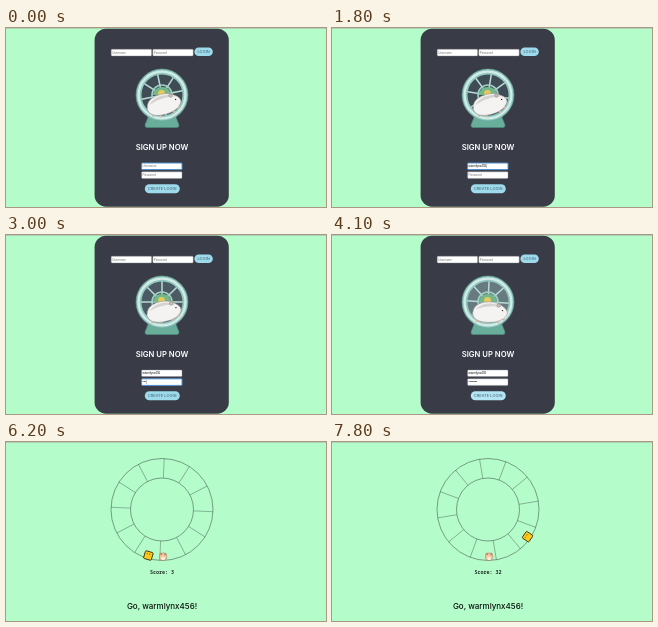
These frames come from a looping animation (320x179 px, 8000 ms). An HTML page:

```html
<!DOCTYPE html>
<html lang="en">
<head>
<meta charset="utf-8">
<title>Hamster wheel</title>
<style>
html, body { margin: 0; height: 100%; overflow: hidden; background: #b5fccb; }
svg { display: block; width: 100vw; height: 100vh; font-family: Inter, sans-serif; }
.field rect { fill: #fff; stroke: #8b8d92; stroke-width: .4; }
.field text { font: 3px "Liberation Sans", Arial, sans-serif; fill: #777; }
.field.filled text { fill: #111; }
.field.focus rect { stroke: #4c8fd0; stroke-width: 1; }
.button rect { fill: #9cdaec; }
.button text { font-size: 4px; fill: #4a6472; text-anchor: middle; }
.title { font-size: 8px; font-weight: 500; text-anchor: middle; }
.heading { font-size: 7.7px; font-weight: 600; fill: #fff; }
#score { font: 700 5px "Noto Sans Mono", monospace; text-anchor: middle; }
</style>
</head>
<body>
<svg viewBox="0 0 320 179" preserveAspectRatio="none">
  <rect width="320" height="179" fill="#b5fccb"/>
  <rect width="320" height=".8" fill="#a9c9b3"/>

  <g id="login">
    <rect x="88.6" y=".7" width="134.2" height="178" rx="11.5" fill="#393c47"/>
    <g id="fields"></g>
    <g class="button"><rect x="188.4" y="19.4" width="18.4" height="8.6" rx="4.3"/><text x="197.6" y="25.1">LOGIN</text></g>

    <path d="M143 87h26l4 10q0 2.5-2 2.5h-30q-2 0-2-2.5z" fill="#69ad9b" stroke="#4f8d80" stroke-width=".6"/>
    <circle cx="156" cy="67" r="22" fill="#3f4c56"/>
    <circle id="glow" cx="156" cy="67" r="21" fill="#a8c8c8"/>
    <g id="cage" fill="none" stroke="#b9dcd6" stroke-width="1.5"></g>
    <circle cx="156" cy="67" r="10" fill="none" stroke="#9fcfc5" stroke-width="1.6"/>
    <circle cx="156" cy="67" r="23.2" fill="none" stroke="#91c8bf" stroke-width="5.4"/>
    <circle cx="156" cy="67" r="23.4" fill="none" stroke="#d3ece7" stroke-width="2.2"/>
    <circle cx="156" cy="67" r="26" fill="none" stroke="#6ba79c" stroke-width=".6"/>
    <path d="M147 67q1-8 9-8t9 8z" fill="#74b78b"/>
    <circle cx="155.5" cy="65.5" r="3.4" fill="#e8c95a"/>
    <g id="runner" stroke="#8f8b8a" stroke-width=".5">
      <path d="M-11 6l-2 3M-5 9l-1 2M7 8l2 2M12 6l3 1" stroke="#dfb9ac" stroke-width="1.8" stroke-linecap="round"/>
      <path d="M-17 1q1-9 11-11 11-2 18 3 8 5 5 10-5 7-18 7-15 0-16-9z" fill="#f4f3f1"/>
      <path d="M-14-3q6-6 14-6 8 0 13 4-13-3-27 2z" fill="#d5d2cf" stroke="none"/>
      <circle cx="9" cy="-7" r="1.8" fill="#cbb9b3"/>
      <circle cx="13" cy="-2" r=".7" fill="#222" stroke="none"/>
    </g>

    <text class="title heading" x="156" y="122">SIGN UP NOW</text>
    <g class="button"><rect id="create" x="138.8" y="156.3" width="35" height="9" rx="4.5"/><text x="156.2" y="162.2">CREATE LOGIN</text></g>
  </g>

  <g id="game">
    <g id="wheel" fill="none" stroke="#3a5344" stroke-width=".55">
      <g transform="translate(156 67.5)">
        <circle r="51"/><circle r="31.5"/>
        <g id="spokes" stroke-width=".4"></g>
        <g id="cheese" stroke="#2a2410" stroke-width=".8">
          <rect x="44" y="-4" width="8" height="8" rx="1" fill="#ffc91c"/>
          <path d="M46.5-1.5v1M46.5 1.2v.8" stroke-width=".8"/>
        </g>
      </g>
      <g id="jumper" stroke="#a3705a" stroke-width=".5">
        <path d="M-3.5 0q-.5-3 1.5-3.5 3-1.5 5 .5 1.5 3 .2 5-3 2.5-5.8 1Q-3.5 2-3.5 0z" fill="#f8c9a4"/>
        <circle cx="-2" cy="-3" r="1" fill="#e99a72"/><circle cx="2.3" cy="-2.8" r="1" fill="#e99a72"/>
        <ellipse cx=".2" cy="1.4" rx="1.8" ry="1.5" fill="#fff1e4" stroke="none"/>
      </g>
      <text id="score" x="156" y="131.8" fill="#1b2a20" stroke="none"></text>
    </g>
    <text id="cheer" class="title" fill="#0b120e"></text>
  </g>
</svg>
<script>
const LOOP = 8000, GAME = 5300, SPIN = 5900, USER = "warmlynx456";
const $ = id => document.getElementById(id);
const set = (el, attrs) => { for (const k in attrs) el.setAttribute(k, attrs[k]); };
const clamp = (v, lo, hi) => Math.min(hi, Math.max(lo, v));

function add(parent, tag, attrs) {
  const el = document.createElementNS("http://www.w3.org/2000/svg", tag);
  set(el, attrs);
  return parent.appendChild(el);
}

function field(x, y, hint) {
  const g = add($("fields"), "g", {});
  add(g, "rect", { x, y, width: 40.4, height: 6.6, rx: .8 });
  const label = add(g, "text", { x: x + 1, y: y + 4.4 });
  return (value, focus) => {
    g.setAttribute("class", "field" + (value ? " filled" : "") + (focus ? " focus" : ""));
    label.textContent = (value || hint) + (focus && value ? "|" : "");
  };
}

function spokes(parent, count, inner, outer) {
  for (let i = 0; i < count; i++)
    add(parent, "path", { d: `M${inner} 0H${outer}`, transform: `rotate(${i * 360 / count})` });
}

field(105.2, 21.3, "Username")("");
field(146.8, 21.3, "Password")("");
const username = field(135.6, 135, "Username");
const password = field(135.6, 143.8, "Password");
spokes($("cage"), 8, 2, 22);
spokes($("spokes"), 12, 31.5, 51);
$("cheer").textContent = `Go, ${USER}!`;

function drawLogin(t) {
  const onPassword = t >= 2100;
  username(USER.slice(0, clamp(Math.floor((t - 230) / 142), 0, 11)), !onPassword);
  password("•".repeat(clamp(Math.floor((t - 2570) / 135), 0, 8)), onPassword && t < 4000);
  $("create").style.fill = t >= 4000 ? "#b3e5f3" : "";

  const run = t < 4000 ? clamp(t, 100, 3600) : Math.min(t, 4100);
  const swing = Math.cos((run - 100) / 425 * 2 * Math.PI);
  set($("cage"), { transform: `translate(156 67) rotate(${-run * .12})` });
  set($("glow"), { opacity: .2 * (1 - swing) });
  set($("runner"), { transform: `translate(157.5 ${77 - swing * .5}) rotate(${-6 - 8 * swing})` });
}

function drawGame(t) {
  const spinning = t >= SPIN;
  $("wheel").style.display = spinning ? "" : "none";
  set($("cheer"), spinning ? { x: 156, y: 166.8 } : { x: 157.2, y: 19.6 });
  const angle = 75 - (Math.max(t, 6000) - 6900) * .045;
  set($("spokes"), { transform: `rotate(${angle - 74})` });
  set($("cheese"), { transform: `rotate(${angle})` });
  const hop = Math.sin(clamp((t - 6300) / 900, 0, 1) * Math.PI);
  set($("jumper"), { transform: `translate(157 ${115 - 26.5 * hop})` });
  $("score").textContent = "Score: " + Math.max(0, Math.floor(16.1 + (t - 6900) / 56.25));
}

function draw(now) {
  const t = Math.floor(now % LOOP / 100) * 100;
  const playing = t >= GAME;
  $("login").style.display = playing ? "none" : "";
  $("game").style.display = playing ? "" : "none";
  (playing ? drawGame : drawLogin)(t);
  requestAnimationFrame(draw);
}
draw(performance.now());
</script>
</body>
</html>
```
